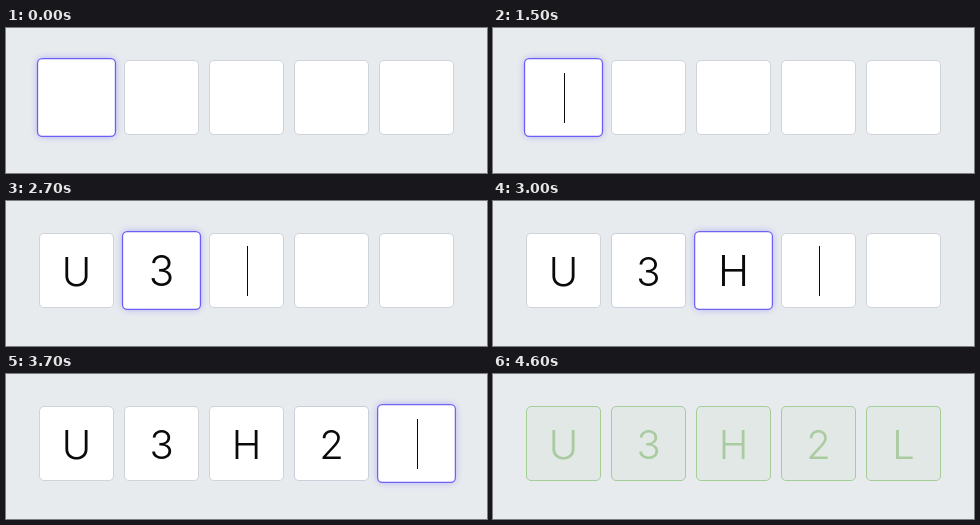
These frames come from a looping animation (481x145 px, 6300 ms). An HTML page with a canvas:

```html
<!DOCTYPE html>
<html lang="en">
<head>
<meta charset="utf-8">
<title>Code input</title>
<style>
html, body { margin: 0; width: 100%; height: 100%; overflow: hidden; background: #e8ebee; }
canvas { display: block; }
</style>
</head>
<body>
<canvas id="stage" width="481" height="145"></canvas>
<script>
const ctx = document.getElementById('stage').getContext('2d');
const LOOP = 6300, STEP = 100, SETTLE = 95, BLINK = 600;
const CODE = 'U3H2L';
const focusAt = [-2000, 1800, 2700, 3000, 3400, 3901];  // the last entry is the success state
const caretAt = [300, ...focusAt.slice(1)];

const IDLE = [207, 211, 218], FOCUS = [107, 94, 245], OK = [163, 207, 151];
const INK = [8, 10, 12], OK_INK = [169, 203, 160];

const ease = dt => dt <= 0 ? 0 : 1 - Math.exp(-dt / SETTLE);
const mix = (a, b, p) => a.map((v, i) => v + (b[i] - v) * p);
const rgb = c => `rgb(${c.map(Math.round)})`;

function drawBox(i, t) {
  const done = t >= focusAt[5], success = ease(t - focusAt[5]), late = success ** 2;
  const leave = i === 4 ? late : ease(t - focusAt[i + 1]);
  const focus = ease(t - focusAt[i]) * (1 - leave);
  const scale = 1 + 0.053 * focus;

  ctx.save();
  ctx.translate(70.5 + 85 * i, 69.5);
  ctx.scale(scale, scale);

  ctx.beginPath();
  ctx.roundRect(-37, -37, 74, 74, 4.5);
  ctx.shadowColor = `rgba(95, 80, 245, ${0.42 * focus})`;
  ctx.shadowBlur = 7;
  ctx.fillStyle = done ? '#e1e8e5' : '#fff';
  ctx.fill();
  ctx.shadowColor = 'transparent';
  ctx.strokeStyle = rgb(mix(mix(IDLE, OK, late), FOCUS, focus));
  ctx.lineWidth = 1 + 0.2 * focus;
  ctx.stroke();

  const typed = t >= focusAt[i + 1];
  const since = t - caretAt[i];
  if (typed) {
    ctx.fillStyle = rgb(mix(INK, OK_INK, success));
    ctx.fillText(CODE[i], 0, 15);
  } else if (since >= 0 && since % (2 * BLINK) < BLINK) {
    ctx.fillStyle = rgb(INK);
    ctx.fillRect(0.5 / scale, -24.5 / scale, 1 / scale, 50 / scale);
  }
  ctx.restore();
}

function frame(now) {
  const t = Math.floor(now % LOOP / STEP) * STEP;
  ctx.fillStyle = '#e8ebee';
  ctx.fillRect(0, 0, 481, 145);
  ctx.font = '300 40px Inter, "Helvetica Neue", sans-serif';
  ctx.textAlign = 'center';
  for (let i = 0; i < 5; i++) drawBox(i, t);
}

const start = performance.now();
function tick() {
  frame(performance.now() - start);
  requestAnimationFrame(tick);
}
tick();
</script>
</body>
</html>
```
